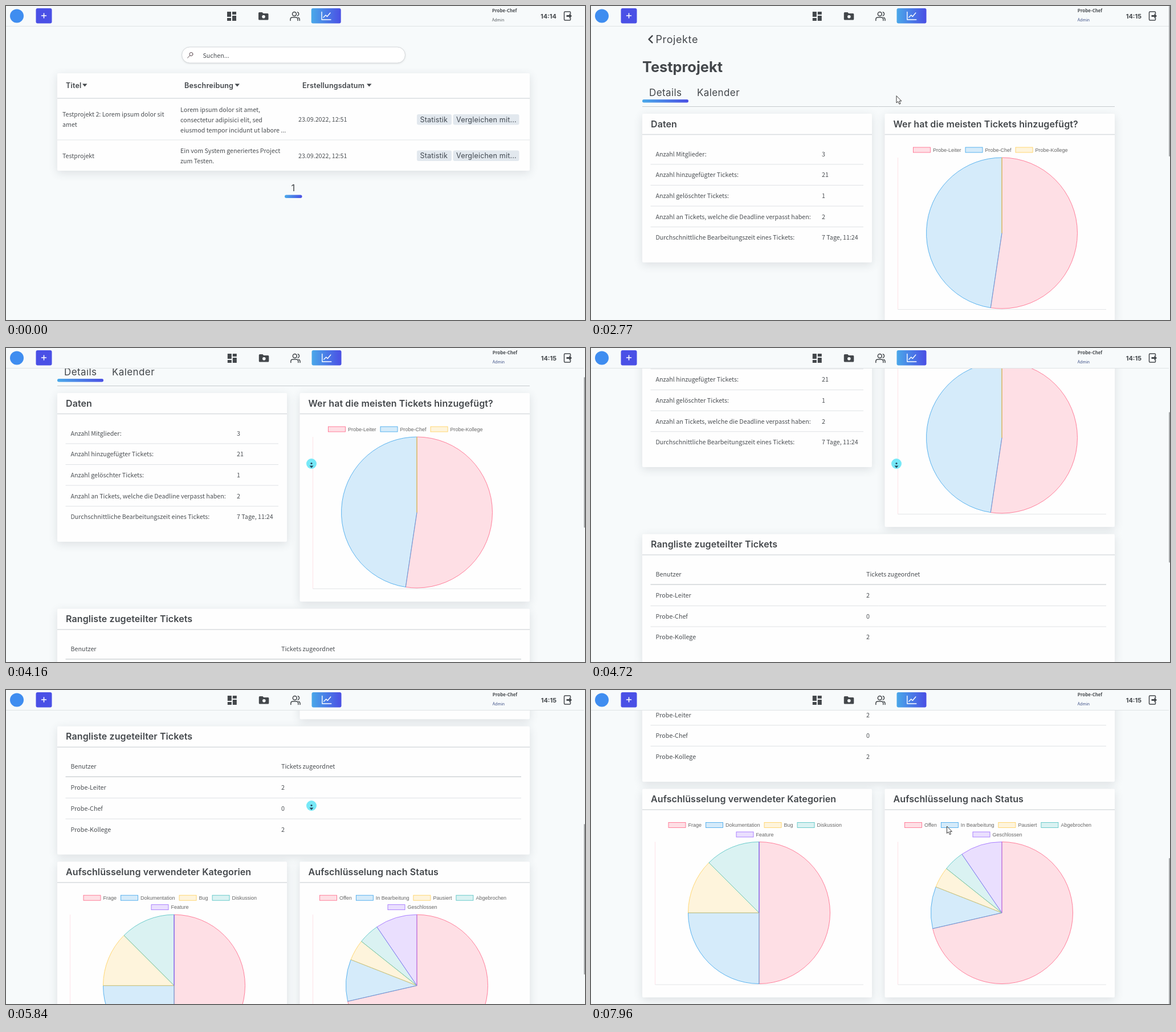
An HTML page with a canvas that plays this animation: 1016 by 551 pixels, repeating every 8000 ms.

```html
<!DOCTYPE html>
<html lang="de">
<head>
<meta charset="utf-8">
<title>Projektstatistik</title>
<style>
html, body { margin: 0; width: 100%; height: 100%; overflow: hidden; background: #f7fafb; }
canvas { display: block; }
</style>
</head>
<body>
<canvas id="stage" width="1016" height="551"></canvas>
<script>
const W = 1016, H = 551, LOOP = 8000;
const ctx = document.getElementById('stage').getContext('2d');

const BODY = '"Noto Sans CJK JP", "Noto Sans CJK SC", "Noto Sans CJK", "Noto Sans", sans-serif';
const HEAD = 'Inter, "Open Sans", sans-serif';
const INK = '#43474b', BG = '#f7fafb';

// "drop" moves the baseline so that y is the middle of the capitals.
const style = (weight, size, family, drop, color = INK, spacing = 0) =>
  ({ font: `${weight} ${size}px ${family}`, drop, color, spacing });
const S = {
  body: style(400, 10.7, BODY, 4, '#4b4f53'),
  user: style(700, 7.8, BODY, 3, INK),
  role: style(400, 7, BODY, 2.6, '#555a5e'),
  roleBlue: style(400, 7, BODY, 2.6, '#3c4f86'),
  clock: style(700, 10.9, HEAD, 4),
  column: style(600, 12.5, HEAD, 4.5, INK, 0.2),
  button: style(400, 12.6, HEAD, 4.6, '#434a52', 0.15),
  page: style(400, 16.5, HEAD, 6),
  back: style(400, 18, HEAD, 6.5, INK, 0.6),
  title: style(700, 25.4, HEAD, 9.1),
  tab: style(400, 17, HEAD, 6.2, INK, 0.4),
  card: style(600, 16, HEAD, 5.8, INK, 0.1),
  legend: style(400, 9, '"Liberation Sans", Arial, sans-serif', 3.2, '#666')
};

const PINK = '255,99,132', BLUE = '54,162,235', YELLOW = '255,206,86',
      TEAL = '75,192,192', PURPLE = '153,102,255';
const PALETTE = [PINK, BLUE, YELLOW, TEAL, PURPLE];
const ADMIN = 'Probe-Chef', LEAD = 'Probe-Leiter', MEMBER = 'Probe-Kollege';

function text(str, x, y, s) {
  ctx.font = s.font;
  ctx.fillStyle = s.color;
  ctx.letterSpacing = s.spacing + 'px';
  ctx.fillText(str, x, y + s.drop);
}

function box(x, y, w, h, r, fill) {
  ctx.beginPath();
  ctx.roundRect(x, y, w, h, r);
  ctx.fillStyle = fill;
  ctx.fill();
}

function line(x1, y1, x2, y2, color, width = 1) {
  ctx.beginPath();
  ctx.moveTo(x1, y1);
  ctx.lineTo(x2, y2);
  ctx.strokeStyle = color;
  ctx.lineWidth = width;
  ctx.stroke();
}

function path(d, x, y, { fill, stroke, width = 1.5 } = {}) {
  const p = new Path2D(d);
  ctx.save();
  ctx.translate(x, y);
  if (fill) { ctx.fillStyle = fill; ctx.fill(p); }
  if (stroke) {
    ctx.strokeStyle = stroke;
    ctx.lineWidth = width;
    ctx.lineCap = ctx.lineJoin = 'round';
    ctx.stroke(p);
  }
  ctx.restore();
}

function disc(x, y, r, fill) {
  ctx.beginPath();
  ctx.arc(x, y, r, 0, 2 * Math.PI);
  ctx.fillStyle = fill;
  ctx.fill();
}

function blend(x, w) {
  const g = ctx.createLinearGradient(x, 0, x + w, 0);
  g.addColorStop(0, '#4aa9e9');
  g.addColorStop(1, '#4a50e4');
  return g;
}

function shadowBox(x, y, w, h) {
  ctx.save();
  ctx.shadowColor = 'rgba(60,75,85,.15)';
  ctx.shadowBlur = 16;
  ctx.shadowOffsetY = 4;
  box(x, y, w, h, 2, '#fefefe');
  ctx.restore();
}

function card(title, x, y, w, h) {
  shadowBox(x, y, w, h);
  text(title, x + 15, y + 17.7, S.card);
  line(x, y + 36.5, x + w, y + 36.5, '#d8dcdf', 1.5);
}

function header(detail) {
  const dx = detail ? 0.8 : 0;
  box(0, 0, detail ? 1014 : W, 35.5, 0, BG);
  line(0, 35.5, 1014, 35.5, '#dfe3e5');
  disc(19, 17.5, 12, '#3f8df0');
  box(52.5, 4, 28, 26.5, 3, '#4a50e6');
  path('M-4 0H4M0-4V4', 66.5, 17, { stroke: '#fff', width: 1.6 });

  path('M0 0h7v9h-7zM9 0h7v5h-7zM0 11h7v5h-7zM9 7h7v9h-7z', 388 + dx, 10, { fill: INK });
  path('M1.5 0H6.5L8.5 2H16Q17.5 2 17.5 3.5V12Q17.5 13.5 16 13.5H1.5Q0 13.5 0 12V1.5Q0 0 1.5 0Z',
    443 + dx, 11, { fill: INK });
  disc(452 + dx, 18.8, 2.8, BG);
  path('M9 3.5A3.5 3.5 0 1 1 2 3.5A3.5 3.5 0 1 1 9 3.5M-1.5 15V13Q-1.5 9.5 2 9.5H8Q11.5 9.5 11.5 13V15' +
    'M11 .3A3.4 3.4 0 0 1 11 6.7M12.5 9.7Q14.7 10.5 14.7 13V15', 500.5 + dx, 10.5, { stroke: INK });
  box(535.7 + dx, 4, 52, 26.5, 3, blend(535.7, 52));
  path('M0 0V13.5H16M3 9.5L7 5.5L9.5 8L15 1.5', 554 + dx, 10.5, { stroke: '#fff', width: 1.4 });

  text(ADMIN, 853 + dx, 7.8, S.user);
  text('Admin', 853 + dx, 24.3, detail ? S.roleBlue : S.role);
  text(detail ? '14:15' : '14:14', 938 + dx, 17.7, S.clock);
  path('M0 4V1.5Q0 0 1.5 0H9.5Q11 0 11 1.5V4M0 11V13.5Q0 15 1.5 15H9.5Q11 15 11 13.5V11M0 4V11',
    979.5, 10, { stroke: INK });
  path('M0-1.5H5V-4.5L9.5 0L5 4.5V1.5H0Z', 983.5, 17.5, { fill: INK });
}

function rowButtons(y, hover) {
  box(721, y - 9, 61, 18.5, 3, hover ? '#cbd5e0' : '#e2e8ee');
  text('Statistik', 726.5, y, S.button);
  box(784.5, y - 9, 116, 18.5, 3, '#e2e8ee');
  text('Vergleichen mit...', 790, y, S.button);
}

function listPage(hover) {
  ctx.save();
  ctx.shadowColor = 'rgba(0,0,0,.12)';
  ctx.shadowBlur = 3;
  ctx.shadowOffsetY = 1;
  box(308.5, 72, 392, 28, 14, '#fff');
  ctx.restore();
  ctx.strokeStyle = '#d3d7da';
  ctx.lineWidth = 1;
  ctx.stroke();
  path('M9.5 3.5A3 3 0 1 1 3.5 3.5A3 3 0 1 1 9.5 3.5M4.3 5.8L0 10', 318.5, 81, { stroke: '#5c4a50', width: 1 });
  text('Suchen...', 345.5, 86.5, S.body);

  shadowBox(90, 118, 829, 171);
  [['Titel', 105, 134], ['Beschreibung', 313, 401.5], ['Erstellungsdatum', 520, 633]].forEach(([label, x, arrow]) => {
    text(label, x, 139, S.column);
    path('M0 0H8.5L4.25 5Z', arrow, 136.5, { fill: INK });
  });
  line(90, 162, 919, 162, '#d8dcdf', 1.5);
  line(90, 235, 919, 235, '#e1e5e8');

  text('Testprojekt 2: Lorem ipsum dolor sit', 99, 190.3, S.body);
  text('amet', 99, 208.3, S.body);
  ['Lorem ipsum dolor sit amet,', 'consectetur adipisici elit, sed', 'eiusmod tempor incidunt ut labore ...']
    .forEach((row, i) => text(row, 306, 181.5 + 18 * i, S.body));
  text('Testprojekt', 99, 262.7, S.body);
  text('Ein vom System generiertes Project', 306, 253.7, S.body);
  text('zum Testen.', 306, 271.7, S.body);
  [199.2, 262.7].forEach(y => text('23.09.2022, 12:51', 513, y, S.body));
  rowButtons(199, false);
  rowButtons(262.5, hover);

  text('1', 500.5, 319, S.page);
  box(489, 331.5, 30.5, 5.5, 2.7, blend(489, 30));
}

function legend(items, x, y, first = 0) {
  items.forEach((label, i) => {
    const rgb = PALETTE[first + i];
    ctx.fillStyle = `rgba(${rgb},.2)`;
    ctx.strokeStyle = `rgb(${rgb})`;
    ctx.lineWidth = 0.8;
    ctx.fillRect(x, y - 4.5, 30, 9);
    ctx.strokeRect(x, y - 4.5, 30, 9);
    text(label, x + 34.5, y, S.legend);
    x += 42 + ctx.measureText(label).width;
  });
}

function pie(values, cx, cy, r, grow) {
  const total = values.reduce((a, b) => a + b);
  let angle = -Math.PI / 2;
  line(cx - 182.5, cy - r, cx - 182.5, cy + r + 1.5, '#fde3e8');
  line(cx - 182.5, cy + r + 1.5, cx + 183, cy + r + 1.5, '#e3e5e7');
  values.forEach((v, i) => {
    const end = angle + v / total * 2 * Math.PI * grow;
    ctx.beginPath();
    ctx.moveTo(cx, cy);
    ctx.arc(cx, cy, r, angle, end);
    ctx.closePath();
    ctx.fillStyle = `rgba(${PALETTE[i]},.2)`;
    ctx.strokeStyle = `rgb(${PALETTE[i]})`;
    ctx.lineWidth = 0.8;
    ctx.fill();
    ctx.stroke();
    angle = end;
  });
}

function table(rows, top, x1, x2, valueX, pitch) {
  rows.forEach(([label, value], i) => {
    const y = top + pitch * i;
    text(label, 113.5, y, S.body);
    text(value, valueX, y, S.body);
    if (i < rows.length - 1) line(x1, y + 18.2, x2, y + 18.2, '#dfe2e5');
  });
}

function detailPage(scroll, grow) {
  ctx.save();
  ctx.translate(0, -scroll);
  path('M6 0L0 6L6 12', 101.5, 52.3, { stroke: INK, width: 2.4 });
  text('Projekte', 113.5, 58, S.back);
  text('Testprojekt', 90, 107.3, S.title);
  text('Details', 102, 152, S.tab);
  text('Kalender', 186, 152, S.tab);
  box(90, 164, 81, 5.5, 2.7, blend(90, 81));
  line(90, 176.5, 919, 176.5, '#c6cacd');

  card('Daten', 90, 189, 403, 261);
  table([
    ['Anzahl Mitglieder:', '3'],
    ['Anzahl hinzugefügter Tickets:', '21'],
    ['Anzahl gelöschter Tickets:', '1'],
    ['Anzahl an Tickets, welche die Deadline verpasst haben:', '2'],
    ['Durchschnittliche Bearbeitungszeit eines Tickets:', '7 Tage, 11:24']
  ], 259.7, 104.5, 478, 405, 36.6);

  card('Wer hat die meisten Tickets hinzugefügt?', 515.5, 189, 403.5, 366);
  legend([LEAD, ADMIN, MEMBER], 565.5, 252.5);
  pie([11, 10, 0], 721, 398.5, 132.5, grow);

  card('Rangliste zugeteilter Tickets', 90, 567.5, 829, 225);
  text('Benutzer', 113.5, 638, S.body);
  text('Tickets zugeordnet', 483, 638, S.body);
  line(104.5, 656, 904, 656, '#d0d4d7', 1.5);
  table([[LEAD, '2'], [ADMIN, '0'], [MEMBER, '2']], 675.2, 104.5, 904, 483, 36.6);

  card('Aufschlüsselung verwendeter Kategorien', 90, 805, 403, 366);
  legend(['Frage', 'Dokumentation', 'Bug', 'Diskussion'], 136, 868.5);
  legend(['Feature'], 255, 885, 4);
  pie([4, 2, 1, 1, 0], 295, 1022.5, 124.5, 1);

  card('Aufschlüsselung nach Status', 515.5, 805, 403.5, 366);
  legend(['Offen', 'In Bearbeitung', 'Pausiert', 'Abgebrochen'], 550.5, 868.5);
  legend(['Geschlossen'], 670, 885, 4);
  pie([15, 2, 1, 1, 2], 721, 1022.5, 124.5, 1);
  ctx.restore();
}

const smooth = u => u * u * (3 - 2 * u);

// Interpolates keys of the form [time, ...values].
function track(keys, t, ease = u => u) {
  const last = keys[keys.length - 1];
  if (t <= keys[0][0]) return keys[0].slice(1);
  if (t >= last[0]) return last.slice(1);
  const i = keys.findIndex(k => k[0] > t);
  const a = keys[i - 1], b = keys[i];
  const u = ease((t - a[0]) / (b[0] - a[0]));
  return a.slice(1).map((v, j) => v + (b[j + 1] - v) * u);
}

const POINTER = [
  [130, 945, 540], [930, 627, 363], [990, 629, 362], [1600, 753, 263],
  [1870, 755, 262], [2710, 536, 158], [3250, 536, 158], [3850, 536, 203],
  [6750, 536, 203], [7200, 690, 377], [7550, 779, 325], [7960, 624.5, 239.5]
];
const SCROLL = [
  [3910, 51.5], [4160, 110], [4720, 241], [5413, 403.5], [6222, 600], [6350, 631.5]
];

function scrollAt(t) {
  if (t < 3910) return 51.5 * Math.max(0, (t - 3250) / 660) ** 3;
  return track(SCROLL, t)[0];
}

// Bursts of screen updates: first time, last time, count.
const BURSTS = [
  [130, 930, 13], [990, 1670, 11], [1800, 2580, 11], [2650, 2770, 3], [3030, 3030, 1],
  [3250, 4020, 12], [4090, 4860, 12], [4930, 5690, 12], [5760, 6420, 11],
  [6750, 7550, 12], [7630, 7960, 6]
];

function lastUpdate(t) {
  const burst = BURSTS.filter(b => b[0] <= t).pop();
  if (!burst) return 0;
  const [start, end, count] = burst;
  if (t >= end) return end;
  const step = (end - start) / (count - 1);
  return start + Math.floor((t - start + 4) / step) * step;
}

function pointer(t, hand) {
  const [x, y] = track(POINTER, t, smooth);
  if (t >= 3030 && t < 6750) {
    disc(x, y, 9, '#76e8f7');
    disc(x, y - 0.5, 1.6, '#27465c');
    path('M-3.5 3H3.5L0 7Z', x, y + 0.5, { fill: '#27465c' });
  } else if (hand) {
    path('M-1.5 1Q0-1 1.5 1V6L7 7.5Q8.5 8 8 10L7 15H-1L-5 9.5Q-5 7.5-3 8.5L-1.5 10Z',
      x, y, { fill: '#fff', stroke: '#222', width: 0.9 });
  } else {
    path('M0 0V12L2.8 9.5L5 14.2L7 13.3L5 8.8H8.5Z', x, y, { fill: '#fff', stroke: '#222', width: 0.9 });
  }
}

function draw(now) {
  const t = lastUpdate(now % LOOP);
  const detail = t >= 1800;
  const hover = t >= 1480 && !detail;
  ctx.fillStyle = BG;
  ctx.fillRect(0, 0, W, H);
  if (detail) {
    const scroll = scrollAt(t);
    const u = Math.min(1, Math.max(0, (t - 1840) / 1000));
    detailPage(scroll, t >= 2770 ? 1 : 1 - (1 - u) ** 4);
    header(true);
    box(1014, scroll * 0.467, 3, 264, 1, '#a6a9ab');
  } else {
    listPage(hover);
    header(false);
  }
  if (t >= 130) pointer(t, hover);
}

const begin = performance.now();
function tick() {
  draw(performance.now() - begin);
  requestAnimationFrame(tick);
}
tick();
</script>
</body>
</html>
```
